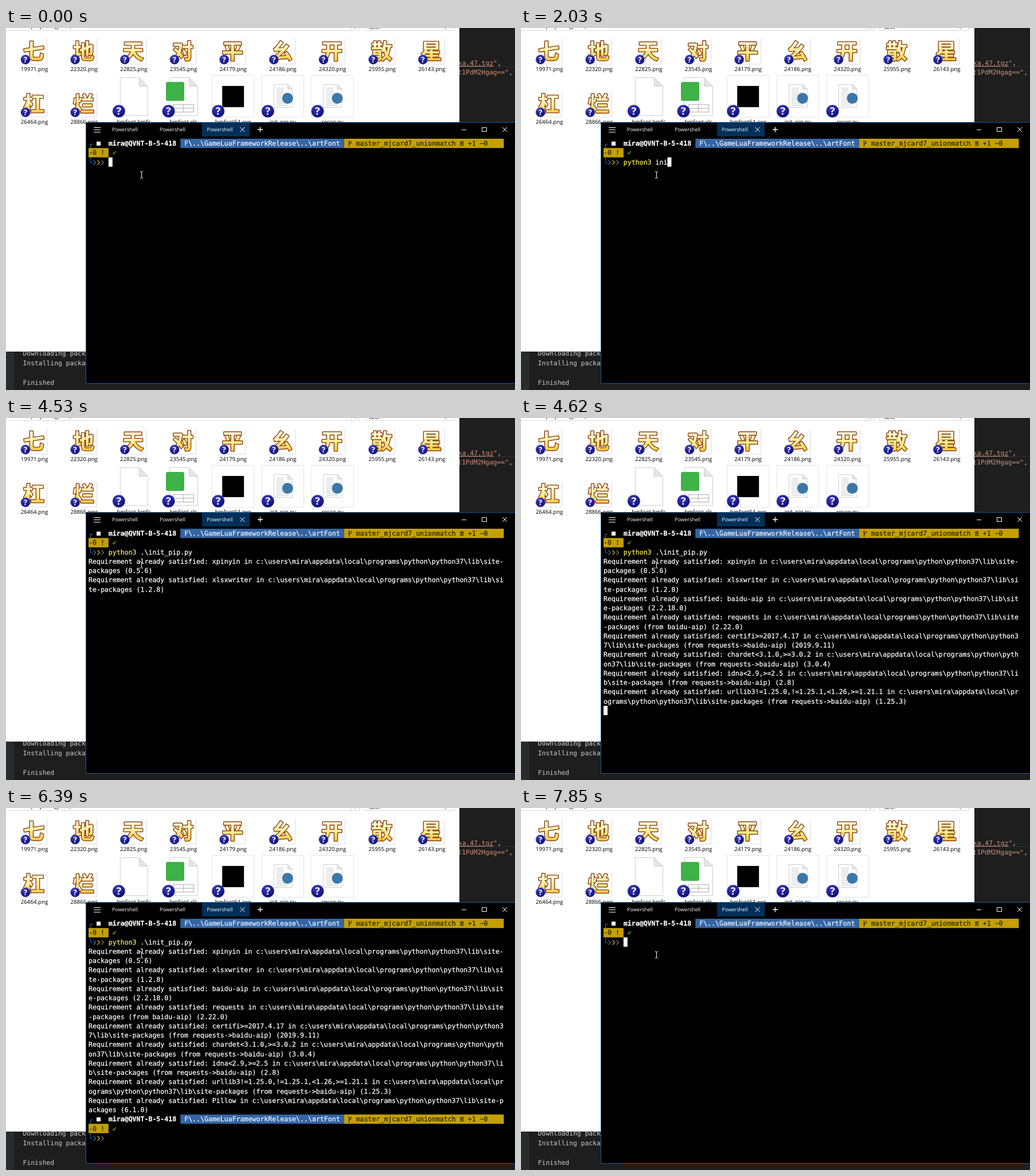
Recreate the animation shown at these times as an HTML page. Size 888x631 px, loop 8000 ms.

```html
<!DOCTYPE html>
<html lang="zh-CN">
<head>
<meta charset="utf-8">
<title>Terminal session</title>
<style>
  html, body { margin: 0; width: 100%; height: 100%; overflow: hidden; background: #1e1e1e; }
  svg { display: block; width: 100vw; height: 100vh; }
  text { white-space: pre; text-rendering: geometricPrecision; }
  .mono { font: 11.57px "DejaVu Sans Mono", monospace; fill: currentColor; stroke: currentColor; stroke-width: .25; }
  .code { font: 11.35px "DejaVu Sans Mono", monospace; fill: #ccc; }
  .label { font: 9.7px "Open Sans", "Noto Sans", sans-serif; text-anchor: middle; fill: #000; }
  .tab { font: 8.8px "Open Sans", "Noto Sans", sans-serif; text-anchor: middle; fill: #fff; }
  .glyph { font: 900 37px "Noto Sans CJK SC", "Noto Sans CJK", sans-serif; text-anchor: middle;
           fill: url(#gold); stroke: #8f4a1c; stroke-width: 3; stroke-linejoin: round; paint-order: stroke; }
  .mark { font: bold 14px "Open Sans", sans-serif; text-anchor: middle; fill: #fff; }
  .bold { font-weight: bold; }
  .line { fill: none; stroke: #fff; }
  .beam { mix-blend-mode: difference; }
</style>
</head>
<body>
<svg viewBox="0 0 888 631" preserveAspectRatio="none">
  <defs>
    <linearGradient id="gold" x1="0" y1="0" x2="0" y2="1">
      <stop offset=".25" stop-color="#fffbe0"/>
      <stop offset=".55" stop-color="#ffee98"/>
      <stop offset=".85" stop-color="#ffcb3c"/>
    </linearGradient>
    <radialGradient id="navy" cx=".4" cy=".3" r=".75">
      <stop offset="0" stop-color="#3c3cc0"/>
      <stop offset="1" stop-color="#08086c"/>
    </radialGradient>
    <clipPath id="editorClip"><rect x="791" width="97" height="164"/></clipPath>
    <clipPath id="barClip"><rect width="791" height="4"/></clipPath>
  </defs>

  <rect width="888" height="631" fill="#1e1e1e"/>
  <rect y="564" width="14" height="67" fill="#292c2d"/>
  <g clip-path="url(#editorClip)">
    <path d="M791 67.5H888" stroke="#303030"/>
    <text class="code" x="864" y="65" text-anchor="end" style="fill:#ce9178"><tspan text-decoration="underline">ka.47.tgz</tspan>"<tspan fill="#ccc">,</tspan></text>
    <text class="code" x="884" y="81" text-anchor="end" style="fill:#ce9178">t1PdM2Hgag=="<tspan fill="#ccc">,</tspan></text>
  </g>
  <text class="code" x="29.5" y="571">Downloading package</text>
  <text class="code" x="29.5" y="588">Installing package</text>
  <text class="code" x="29.5" y="622">Finished</text>

  <rect width="791" height="564" fill="#fff"/>
  <path d="M0 4.5H616.500V0M602.500 0V4.500M625.500 0V4.500H781.500V0" fill="none" stroke="#d9d9d9"/>
  <g clip-path="url(#barClip)">
    <text class="label" x="92" y="0">project › (game) › font</text>
    <text class="label" x="643" y="1">搜索</text>
    <path d="M607 -2l2.500 3l2.500 -3M764 -1l4 3" class="line" style="stroke:#777"/>
  </g>
  <g id="files"></g>

  <rect x="139.500" y="164.500" width="749" height="455" fill="#000" stroke="#185a94"/>
  <rect x="342" y="165" width="83" height="24" fill="#00305a"/>
  <path class="line" d="M153 173.500h12M153 177.500h12M153 181.500h12"/>
  <text class="tab" x="207.500" y="180">Powershell</text>
  <text class="tab" x="290.500" y="180">Powershell</text>
  <text class="tab" x="373" y="180">Powershell</text>
  <path class="line" d="M408.500 173l8 8m0 -8l-8 8M866 173l8 8m0 -8l-8 8"/>
  <path class="line" d="M439 177h9M443.500 172.500v9" stroke-width="1.300"/>
  <path class="line" d="M795 177.500h8M830.500 173.500h8v7h-8z"/>

  <g id="screen"></g>
  <path class="line beam" d="M234 250.500h2M237 250.500h2M236.500 251v10M234 261.500h2M237 261.500h2"/>
</svg>

<script>
const LOOP = 8000, COLS = 104, CELL = 6.966, ROW = 16.25;
const USER = "mira", HOST = "QVNT-B-5-418";
const BLUE = "#3465a4", GOLD = "#c4a000", YELLOW = "#f4ea55";

const esc = s => s.replace(/&/g, "&amp;").replace(/</g, "&lt;").replace(/>/g, "&gt;");
const colX = col => 144 + col * CELL;
const rowY = row => 193 + row * ROW;

const rect = (x, y, w, h, fill, more = "") =>
  `<rect x="${x}" y="${y}" width="${w}" height="${h}" fill="${fill}" ${more}/>`;
const stroke = (d, color, width = 1, fill = "none") =>
  `<path d="${d}" fill="${fill}" stroke="${color}" stroke-width="${width}"/>`;

// File icons
const badge = (x, y, r) => `<circle cx="${x}" cy="${y}" r="${r}" fill="url(#navy)" stroke="#9aa0d0" stroke-width=".7"/>
  <text class="mark" x="${x}" y="${y + r * .58}" style="font-size:${r * 1.6}px">?</text>`;
const label = (x, y, name) => `<text class="label" x="${x}" y="${y}">${name}</text>`;
const page = (x, y, w, h, fold) =>
  stroke(`M${x} ${y}h${w - fold}l${fold} ${fold}v${h - fold}h${-w}z`, "#cfcfcf", 1, "#fff") +
  stroke(`M${x + w - fold} ${y}v${fold}h${fold}z`, "#cfcfcf", 1, "#e6e6e6");
const card = x => rect(x - 36.5, 82.5, 73, 73, "#fff", 'stroke="#e4e4e4"');

const thumb = (x, y, char, name) =>
  stroke(`M${x - 22} ${y + 22.5}h44v-44`, "#dcdcdc") +
  `<text class="glyph" x="${x - 1}" y="${y + 13.5}">${char}</text>` +
  badge(x - 15.5, y + 14.5, 8.3) + label(x, y + 34, name);

const script = x => {
  let lines = "";
  for (let y = 105; y < 136; y += 3) lines += `M${x - 11} ${y}h${y < 112 ? 13 : 21}`;
  return card(x) + page(x - 15.5, 98.5, 32, 40, 8) + stroke(lines, "#c4c8cc") +
    `<circle cx="${x + 8.5}" cy="122.5" r="9.5" fill="#3b77a8"/>`;
};
const sheet = x => page(x - 24, 86.5, 49, 66, 15) +
  stroke(`M${x - 17} 133.5h35v13h-35zM${x - 17} 140h35M${x} 133.5v13`, "#c4c4c4", 1.5) +
  rect(x - 30.5, 94, 32, 33, "#3fb247", 'rx="3"');

const fileIcons = [
  ["bmfont.bmfc", x => page(x - 23.5, 86.5, 48, 66, 15)],
  ["bmfont.xls", sheet],
  ["bmfont64.exe", x => card(x) + rect(x - 19, 101, 38, 37, "#000")],
  ["init_pip.py", script],
  ["recog.py", script]
];
const images = [..."七地天对平幺开散星杠烂"];
const numbers = [19971, 22320, 22825, 23545, 24179, 24186, 24320, 25955, 26143, 26464, 28866];
const slotX = i => 49.5 + 86.67 * i;

document.getElementById("files").innerHTML =
  images.map((char, i) => thumb(slotX(i % 9), i < 9 ? 40.5 : 132.5, char, numbers[i] + ".png")).join("") +
  fileIcons.map(([name, draw], i) => {
    const x = slotX(i + 2);
    return draw(x) + badge(x - 26, 145, 11) + label(x, 166.5, name);
  }).join("");

// Terminal output
const text = (col, row, str, color = "#fff", cls = "") =>
  `<text class="mono ${cls}" x="${colX(col)}" y="${rowY(row) + 12}" style="color:${color}">${esc(str)}</text>`;
const fillCells = (col, row, count, color) =>
  rect(colX(col), rowY(row), count * CELL, ROW, color);

const VIA = "(from requests->baidu-aip) ";
const packages = [
  ["xpinyin", "(0.5.6)"],
  ["xlsxwriter", "(1.2.8)"],
  ["baidu-aip", "(2.2.18.0)"],
  ["requests", "(from baidu-aip) (2.22.0)"],
  ["certifi>=2017.4.17", VIA + "(2019.9.11)"],
  ["chardet<3.1.0,>=3.0.2", VIA + "(3.0.4)"],
  ["idna<2.9,>=2.5", VIA + "(2.8)"],
  ["urllib3!=1.25.0,!=1.25.1,<1.26,>=1.21.1", VIA + "(1.25.3)"],
  ["Pillow", "(6.1.0)"]
].map(([name, tail]) => `Requirement already satisfied: ${name} in ` +
  `c:\\users\\${USER}\\appdata\\local\\programs\\python\\python37\\lib\\site-packages ${tail}`);

function promptStart(row) {
  const y = rowY(row);
  return stroke(`M147.5 ${y + 16}v-6.5h4`, "#5f7897") +
    rect(158, y + 5, 7, 7, "#fff") +
    text(5, row, `${USER}@${HOST}`, "#fff", "bold") +
    fillCells(23, row, 41, BLUE) +
    text(24, row, "F\\..\\GameLuaFrameworkRelease\\..\\artFont", "#eef2f8");
}

function promptEnd(row) {
  const y = rowY(row), dark = "#2b2815";
  const chevrons = [BLUE, GOLD, "#75607f"].map((color, i) =>
    stroke(`M${colX(i + 1) + 1.5} ${rowY(row + 2) + 5}l4 4l-4 4`, color, 1.5)).join("");
  return fillCells(64, row, 40, GOLD) +
    stroke(`M598.5 ${y + 3}v11M598.5 ${y + 10}l3.5 -3v-3`, dark, 1.3) +
    text(67, row, "master_mjcard7_unionmatch", dark) +
    text(93, row, "≣", dark) + text(95, row, "+1 ~0", dark) +
    fillCells(0, row + 1, 5, GOLD) + text(0, row + 1, "-0 !", dark) +
    text(6, row + 1, "✔", "#4e9a06") +
    stroke(`M147.5 ${rowY(row + 2)}v9.5h4`, BLUE) + chevrons;
}

function command(row, str) {
  const [name] = str.split(" ");
  return text(5, row, name, YELLOW) + text(5 + name.length, row, str.slice(name.length));
}

function draw({ prompt, cmd, count, prompt2, cmd2, cursor }) {
  let out = "";
  if (prompt) out += promptStart(0) + promptEnd(0) + command(2, cmd);
  packages.slice(0, count).forEach((line, i) => {
    out += text(0, 3 + 2 * i, line.slice(0, COLS)) + text(0, 4 + 2 * i, line.slice(COLS));
  });
  if (prompt2 > 0) out += promptStart(21);
  if (prompt2 > 1) out += promptEnd(21) + command(23, cmd2);
  if (cursor) out += fillCells(cursor[0], cursor[1], 1, "#fff");
  return out;
}

// Each step changes part of the state
const typed = cmd => ({ cmd, cursor: [5 + cmd.length, 2] });
const typed2 = cmd2 => ({ cmd2, cursor: [5 + cmd2.length, 23] });
const off = { cursor: null };
const steps = [
  [0, { prompt: 1, count: 0, prompt2: 0, cmd2: "", ...typed("") }],
  [80, typed("python")],
  [640, off],
  [920, typed("python3")],
  [1010, typed("python3 ")],
  [1570, off],
  [1840, typed("python3 i")],
  [1930, typed("python3 in")],
  [2020, typed("python3 ini")],
  [2110, typed("python3 .\\init_pip.py")],
  [2570, { cursor: [0, 3] }],
  [3130, off],
  [3320, { count: 1, cursor: [0, 5] }],
  [3880, off],
  [3980, { count: 2, cursor: [0, 7] }],
  [4530, off],
  [4620, { count: 8, cursor: [0, 19] }],
  [5270, { count: 9, cursor: [0, 21] }],
  [5460, { prompt2: 1, cursor: [65, 21] }],
  [5830, { prompt2: 2, ...typed2("") }],
  [6390, off],
  [6760, typed2("c")],
  [6850, typed2("cl")],
  [6940, typed2("cle")],
  [7120, typed2("clea")],
  [7300, typed2("clear")],
  [7570, { prompt: 0, count: 0, prompt2: 0, cursor: [0, 0] }],
  [7850, { prompt: 1, ...typed("") }]
];

const screen = document.getElementById("screen");
let shown = 0;

function tick() {
  const now = performance.now() % LOOP;
  const past = steps.filter(([at]) => at <= now);
  if (past.length !== shown) {
    shown = past.length;
    screen.innerHTML = draw(Object.assign({}, ...past.map(([, change]) => change)));
  }
  requestAnimationFrame(tick);
}
tick();
</script>
</body>
</html>
```
